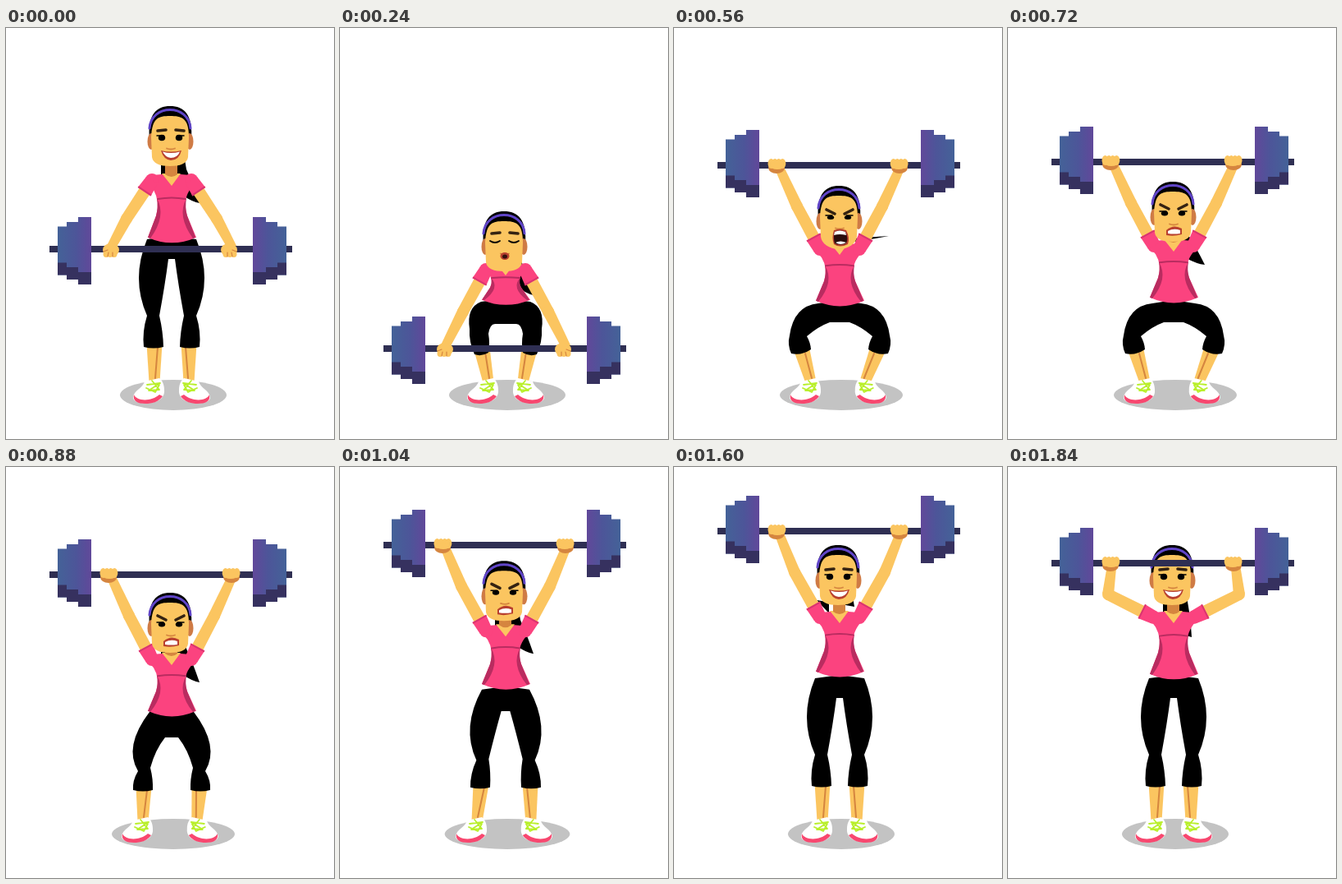
Write an HTML page with a canvas that moves like this. It is 400 by 500 pixels and loops after 1.92 s.

```html
<!DOCTYPE html>
<html lang="en">
<head>
<meta charset="utf-8">
<title>Barbell lift</title>
<style>
  html, body { margin: 0; width: 100%; height: 100%; overflow: hidden; background: #fff; }
  canvas { display: block; width: 400px; height: 500px; }
</style>
</head>
<body>
<canvas id="stage" width="400" height="500"></canvas>
<script>
const ctx = document.getElementById('stage').getContext('2d');
const STEP = 80, STEPS = 24;
const SKIN = '#fbc560', SHADE = '#d5853f', PINK = '#fb437f', DARK_PINK = '#b92c60', BLACK = '#000';

// Left leg outline: hip, thigh bulge, outer knee, outer hem, inner hem, inner knee, inner thigh, crotch, then foot x
const LEGS = {
  stand: [172, 257, 152, 305, 172, 350, 168, 388, 192, 388, 187, 350, 194, 312, 198, 281, 174],
  half: [175, 298, 143, 340, 161, 370, 155, 393, 179, 393, 176, 366, 182, 344, 194, 329, 160],
  deep: [176, 335, 146, 338, 141, 374, 143, 396, 167, 391, 162, 375, 176, 363, 190, 358, 160],
  down: [172, 333, 154, 340, 158, 366, 164, 397, 181, 395, 181, 372, 183, 359, 190, 360, 174]
};
LEGS.wide = LEGS.stand.slice();
[[2, 2], [4, 3], [6, 7], [8, 7], [10, 3], [12, 1], [16, 14]].forEach(([i, d]) => LEGS.wide[i] -= d);

// Key poses by step; every pose inherits what it does not change
const KEYS = [];
[
  { at: 0, bar: 269, head: 95, headX: 200, neck: 178, hip: 257, elbowX: 147, elbowY: -37, tailX: 236, tailY: 35,
    tilt: 0, shadow: 65, left: LEGS.stand, right: LEGS.stand, face: 'smile' },
  { at: 2, bar: 362, head: 193, neck: 262, hip: 314, elbowX: 149, elbowY: -43, shadow: 69, left: LEGS.down, right: LEGS.down, face: 'breathe' },
  { at: 3, bar: 390, head: 223, neck: 287, hip: 332, elbowX: 150, elbowY: -45, tailY: 38, shadow: 71 },
  { at: 4 },
  { at: 5, bar: 335, head: 178, neck: 252, hip: 312, elbowX: 146, elbowY: -38, left: LEGS.half, right: LEGS.half, face: 'grit' },
  { at: 6, bar: 222, head: 160, neck: 234, hip: 303, elbowX: 134, elbowY: 20, tailX: 248, tailY: 20, shadow: 75, face: 'shout' },
  { at: 7, bar: 167, head: 192, headX: 201, neck: 262, hip: 334, elbowX: 150, elbowY: 50, tailX: 262, tailY: -9, left: LEGS.deep, right: LEGS.deep },
  { at: 9, bar: 163, head: 187, neck: 258, hip: 330, tailX: 240, tailY: 30, face: 'grit' },
  { at: 11, bar: 131, head: 153, headX: 200, neck: 227, hip: 299, tailX: 236, tailY: 35, left: LEGS.half, right: LEGS.half },
  { at: 14, bar: 77, head: 95, neck: 175, hip: 250, elbowX: 147, left: LEGS.wide, right: LEGS.wide, shadow: 77, face: 'smile' },
  { at: 16, headX: 198, tailX: 234, tailY: 25, tilt: 1, right: LEGS.stand },
  { at: 18, bar: 69, tailX: 205, tailY: 20, tilt: 0, left: LEGS.stand, shadow: 65 },
  { at: 20, bar: 78, headX: 200, neck: 176, hip: 251, tailX: 174, tailY: -14 },
  { at: 22, bar: 92, hip: 252, elbowX: 136, elbowY: 44, tailX: 200, tailY: 15 },
  { at: 23, bar: 117, hip: 254, elbowX: 122, elbowY: 38, tailX: 224, tailY: 31 }
].forEach((key, i) => KEYS.push({ ...KEYS[i - 1], ...key }));

const mix = (a, b, k) =>
  typeof a === 'number' ? a + (b - a) * k : Array.isArray(a) ? a.map((v, i) => mix(v, b[i], k)) : k < 1 ? a : b;

function poseAt(step) {
  let i = KEYS.length - 1;
  while (KEYS[i].at > step) i--;
  const a = KEYS[i], b = KEYS[i + 1] || a;
  const k = a === b ? 0 : (step - a.at) / (b.at - a.at);
  const pose = {};
  for (const name in a) pose[name] = mix(a[name], b[name], k);
  return pose;
}

function fill(d, color) {
  ctx.fillStyle = color;
  ctx.fill(new Path2D(d));
}

function line(d, color, width, cap = 'round') {
  ctx.strokeStyle = color;
  ctx.lineWidth = width;
  ctx.lineCap = cap;
  ctx.lineJoin = 'round';
  ctx.stroke(new Path2D(d));
}

function oval(x, y, rx, ry, color) {
  ctx.fillStyle = color;
  ctx.beginPath();
  ctx.ellipse(x, y, rx, ry, 0, 0, 7);
  ctx.fill();
}

function rect(x, y, w, h, color) {
  ctx.fillStyle = color;
  ctx.fillRect(x, y, w, h);
}

function limb(x1, y1, x2, y2, w1, w2, color) {
  const len = Math.hypot(x2 - x1, y2 - y1) || 1;
  const nx = (y1 - y2) / len / 2, ny = (x2 - x1) / len / 2;
  fill(`M${x1 + nx * w1},${y1 + ny * w1} L${x2 + nx * w2},${y2 + ny * w2}
    L${x2 - nx * w2},${y2 - ny * w2} L${x1 - nx * w1},${y1 - ny * w1}Z`, color);
}

function mirrored(axis, draw) {
  ctx.save();
  ctx.translate(axis * 2, 0);
  ctx.scale(-1, 1);
  draw();
  ctx.restore();
}

function shoe(x) {
  ctx.save();
  ctx.translate(x, 0);
  fill('M-5,430 C-7,438 -18,441 -19,449 C-19,456 -8,457 2,456 C14,455 20,448 19,440 C19,433 16,428 13,426Z', '#fff');
  fill('M-18,446 C-15,454 3,455 13,446 L17,448 C12,455 4,457 -4,457 C-13,457 -20,454 -18,446Z', '#f8476f');
  line('M-2,434 L14,432 L0,441 L13,440 L4,429 M-3,438 L8,443 L13,434', '#b9ef2c', 1.8);
  ctx.restore();
}

function leg(p, footX) {
  const [ax, ay, bx, by, cx, cy, dx, dy, ex, ey, fx, fy, gx, gy, hx, hy] = p;
  const mid = (dx + ex) / 2 + 1, ankle = footX + 7;
  limb(mid, dy - 4, ankle, 431, 19, 13, SKIN);
  line(`M${mid + 4},${dy} L${ankle + 1},426`, SHADE, 2);
  shoe(footX);
  fill(`M202,${ay - 4} L${ax},${ay} Q${bx},${by} ${cx},${cy} Q${(cx + dx) / 2 - 4},${(cy + dy) / 2} ${dx},${dy}
    Q${(dx + ex) / 2},${dy + 3} ${ex},${ey} Q${(ex + fx) / 2 + 2},${(ey + fy) / 2} ${fx},${fy}
    Q${gx},${gy} ${hx},${hy} L203,${hy} L203,${ay - 4}Z`, BLACK);
}

function ponytail({ neck: n, tailX: x, tailY: y }) {
  fill(`M189,${n - 16} L189,${n + 2} Q${76 + x * .6},${n + 4 + y * .8} ${x},${n + y}
    Q${133 + x * .4},${n - 4 + y * .4} 220,${n - 6} L218,${n - 18}Z`, BLACK);
}

function shirt({ neck, hip }) {
  const y = u => neck + (hip - neck) * u;
  fill(`M190,${neck} L178,${neck + 1} L172,${neck + 8} L180,${y(.24)} Q188,${y(.42)} 183,${y(.64)} L173,${y(.97)}
    Q202,${hip + 11} 232,${y(.97)} L221,${y(.64)} Q215,${y(.42)} 224,${y(.24)} L231,${neck + 8} L225,${neck + 1} L213,${neck}Z`, PINK);
  const panel = () => fill(`M184,${y(.37)} Q196,${y(.64)} 176,${hip - 1} L173,${y(.97)} L183,${y(.64)} Q186,${y(.5)} 184,${y(.37)}Z`, DARK_PINK);
  panel();
  mirrored(202, panel);
  line(`M185,${y(.38)} Q202,${y(.34)} 219,${y(.38)}`, DARK_PINK, 2);
}

function arm(p) {
  const jx = 178, jy = p.neck + 7, ex = p.elbowX, ey = p.bar + p.elbowY;
  const len = Math.hypot(ex - jx, ey - jy), ux = (ex - jx) / len, uy = (ey - jy) / len;
  limb(jx, jy, ex, ey, 15, 14, SKIN);
  oval(ex, ey, 7, 7, SKIN);
  limb(ex, ey, 127, p.bar, 14, 11, SKIN);
  oval(jx, jy, 8, 8, PINK);
  limb(jx, jy, jx + ux * 17, jy + uy * 17, 16, 19, PINK);
  limb(jx + ux * 15, jy + uy * 15, jx + ux * 17, jy + uy * 17, 19, 19, '#d93570');
}

function hand(y, up) {
  if (up) {
    oval(125, y + 3, 10, 7, SHADE);
    for (let i = 0; i < 4; i++) oval(118.5 + i * 4.6, y - 2, 4, 6, SKIN);
    oval(126, y + 1, 9, 4, SKIN);
  } else {
    oval(128, y + 1, 10, 8, SKIN);
    for (let i = 0; i < 3; i++) oval(122 + i * 5, y + 6, 3.5, 4, SKIN);
    line(`M119,${y + 3} L124,${y + 1} M124,${y + 9} L125,${y + 4} M130,${y + 9} L130,${y + 4}`, SHADE, 1.2);
  }
}

function plates(y) {
  [[63, 11, 29.5], [74, 14, 35], [88, 16, 41]].forEach(([x, w, half]) => {
    const g = ctx.createLinearGradient(63, 0, 104, 0);
    g.addColorStop(0, '#446298');
    g.addColorStop(.55, '#4d5599');
    g.addColorStop(1, '#61489a');
    rect(x, y - half, w, half * 2, g);
    rect(x, y + half - 15, w, 15, '#36315f');
  });
}

function barbell({ bar, tilt }, up) {
  ctx.save();
  ctx.translate(201, bar);
  ctx.rotate(tilt * .009);
  ctx.translate(-201, 0);
  rect(53, -4, 296, 8, '#2f2f53');
  const y = up ? -2 : 2;
  plates(y);
  mirrored(202.5, () => plates(y));
  ctx.restore();
}

const FACES = {
  smile() {
    brows(30, 29);
    eyes();
    fill('M-11,54 Q1,57 14,54 Q11,66 1,66 Q-8,65 -11,54Z', '#b8402f');
    fill('M-9,55.5 Q1,58.5 12,55.5 Q9,63 1,63 Q-6,62 -9,55.5Z', '#fff');
  },
  breathe() {
    brows(27, 26);
    line('M-17,36 Q-11,40 -5,36 M6,36 Q12,40 18,36', BLACK, 1.8);
    oval(1, 54.5, 5.5, 4.5, '#b8402f');
    oval(1, 55, 3, 2.5, '#35100f');
  },
  shout() {
    brows(29, 34);
    eyes(2.5);
    fill('M-6,54 Q1,51 9,54 Q14,64 11,71 Q1,76 -6,71 Q-9,63 -6,54Z', '#b8402f');
    fill('M-5,56 Q1,53 8,56 Q12,64 9,70 Q1,73 -5,70 Q-7,63 -5,56Z', '#2a0d0d');
    fill('M-5,56 Q1,53 8,56 L9,60 Q1,58 -6,60Z M-4,69 Q2,66 9,69 Q2,73 -4,69Z', '#fff');
  },
  grit() {
    brows(28, 33);
    eyes(3);
    fill('M-8,59 Q1,51 11,57 L11,64 Q1,67 -8,65Z', '#b8402f');
    fill('M-6,60 Q1,56 9,59 L9,63 Q1,64 -6,63Z', '#fff');
  }
};

function brows(outer, inner) {
  line(`M-15,${outer} L-5,${inner} M7,${inner} L17,${outer}`, '#352312', 3.6);
}

function eyes(h = 3.8) {
  oval(-10, 38.5, 4.2, h, BLACK);
  oval(11, 38.5, 4.2, h, BLACK);
  line('M-16,36 L-8,36 M9,36 L17,36', BLACK, 1.5);
}

function head({ headX, head: top, tilt, face }) {
  ctx.save();
  ctx.translate(headX, top);
  ctx.rotate(tilt * -.04);
  fill('M-25,40 C-28,10 -16,0 0,0 C17,0 28,10 26,40Z', BLACK);
  oval(-23, 43, 4.5, 10, '#cf7b45');
  oval(24, 43, 4.5, 10, '#cf7b45');
  const chin = face === 'shout' ? 77 : 73;
  fill(`M-23,38 C-22,14 -14,12 0,12 C14,12 23,14 23,38 L22,62 C21,70 12,${chin} 0,${chin} C-12,${chin} -21,70 -22,62Z`, SKIN);
  line('M-25,27 C-23,-3 23,-3 25,27', '#6045c8', 3);
  line('M-4,51.5 Q1,53.5 6,51.5', SHADE, 1.8);
  FACES[face]();
  ctx.restore();
}

function draw(step) {
  const p = poseAt(step), up = p.elbowY > 0;
  ctx.clearRect(0, 0, 400, 500);
  oval(204, 446.5, p.shadow, 18.5, '#c3c3c3');
  leg(p.left, p.left[16]);
  mirrored(202, () => leg(p.right, 174 - (174 - p.right[16]) * .7));
  ponytail(p);
  const sleeves = () => { arm(p); mirrored(202, () => arm(p)); };
  shirt(p);
  sleeves();
  fill(`M190,${p.neck - 1} L202,${p.neck + 14} L213,${p.neck - 1}Z`, SKIN);
  fill(`M194,${p.neck - 14} L209,${p.neck - 14} L209,${p.neck} Q202,${p.neck + 6} 194,${p.neck}Z`, SHADE);
  head(p);
  barbell(p, up);
  hand(p.bar - p.tilt, up);
  mirrored(200, () => hand(p.bar + p.tilt, up));
}

let shown = -1;
function tick() {
  const step = Math.floor(performance.now() / STEP) % STEPS;
  if (step !== shown) draw(shown = step);
  requestAnimationFrame(tick);
}
tick();
</script>
</body>
</html>
```
